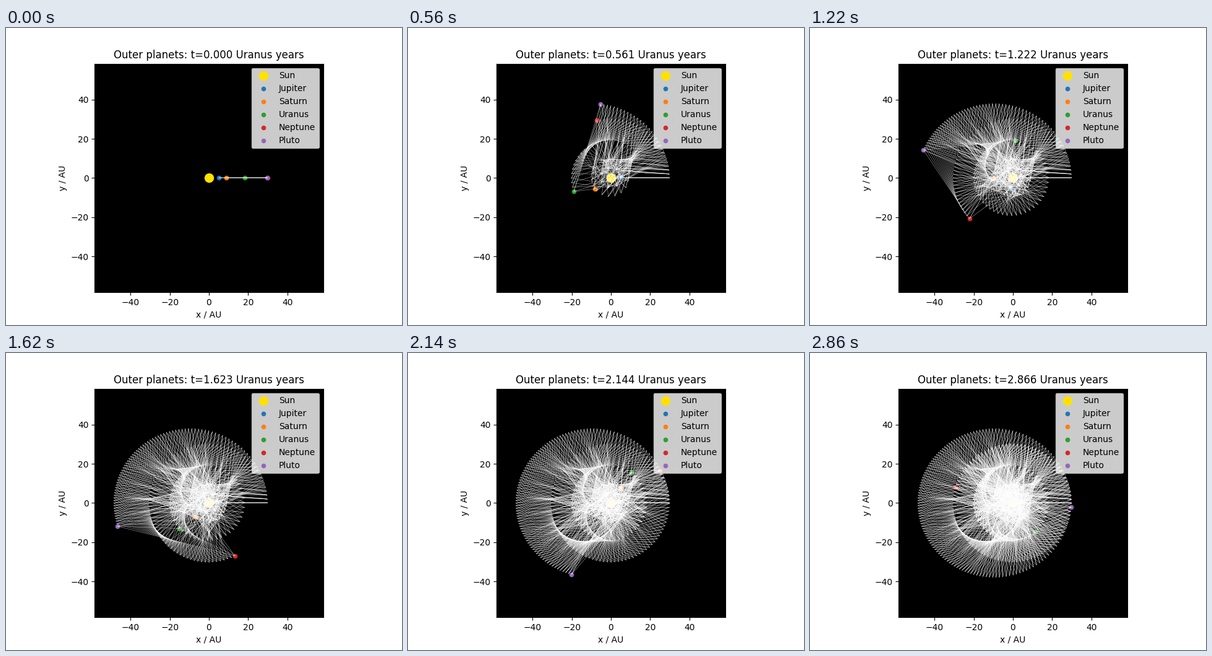
A matplotlib script for the animation above (2.88 s loop, 640x480 px).

```python
from itertools import combinations

import numpy as np
import matplotlib.pyplot as plt
from matplotlib.animation import FuncAnimation
from matplotlib.collections import LineCollection

FRAMES = 144
STEP = 10 / 499  # Uranus years per frame
LIMIT = 58.38

# name: semi-major axis (AU), eccentricity, period (Uranus years)
PLANETS = {
    "Jupiter": (5.202, 0.05, 1 / 7.145),
    "Saturn": (9.576, 0.06, 1 / 2.8604),
    "Uranus": (19.293, 0.05, 1.0),
    "Neptune": (30.246, 0.01, 1.966),
    "Pluto": (39.13, 0.2425, 2.885),
}


def orbit(t, a, e, period):
    """Position on a Kepler ellipse that starts at perihelion on the x axis."""
    mean = 2 * np.pi * t / period
    ecc = mean + e * np.sin(mean)
    for _ in range(8):
        ecc -= (ecc - e * np.sin(ecc) - mean) / (1 - e * np.cos(ecc))
    x = a * (np.cos(ecc) - e)
    y = a * np.sqrt(1 - e * e) * np.sin(ecc)
    return np.column_stack([x, y])


times = np.arange(FRAMES) * STEP
# shape: (frame, planet, xy)
tracks = np.stack([orbit(times, *p) for p in PLANETS.values()], axis=1)

# every frame joins each pair of planets
pairs = np.array(list(combinations(range(len(PLANETS)), 2)))
chords = tracks[:, pairs].reshape(-1, 2, 2)

fig, ax = plt.subplots(figsize=(6.4, 4.8), dpi=100)
ax.set_facecolor("black")
ax.set_aspect("equal")
ax.set_xlim(-LIMIT, LIMIT)
ax.set_ylim(-LIMIT, LIMIT)
ax.set_xlabel("x / AU")
ax.set_ylabel("y / AU")
title = ax.set_title("")

ax.scatter(0, 0, s=100, color="#ffe100", label="Sun")
dots = [
    ax.scatter(*tracks[0, k], s=20, color=f"C{k}", label=name)
    for k, name in enumerate(PLANETS)
]
ax.legend(loc="upper right")

links = LineCollection([], colors="white", linewidths=0.25, zorder=2,
                       capstyle="projecting")
ax.add_collection(links, autolim=False)


def update(i):
    title.set_text(f"Outer planets: t={times[i]:.3f} Uranus years")
    for dot, pos in zip(dots, tracks[i]):
        dot.set_offsets(pos)
    links.set_segments(chords[:(i + 1) * len(pairs)])
    return [title, links, *dots]


anim = FuncAnimation(fig, update, frames=FRAMES, interval=20,
                     init_func=lambda: update(0), repeat=True, repeat_delay=0)
plt.show()
```
